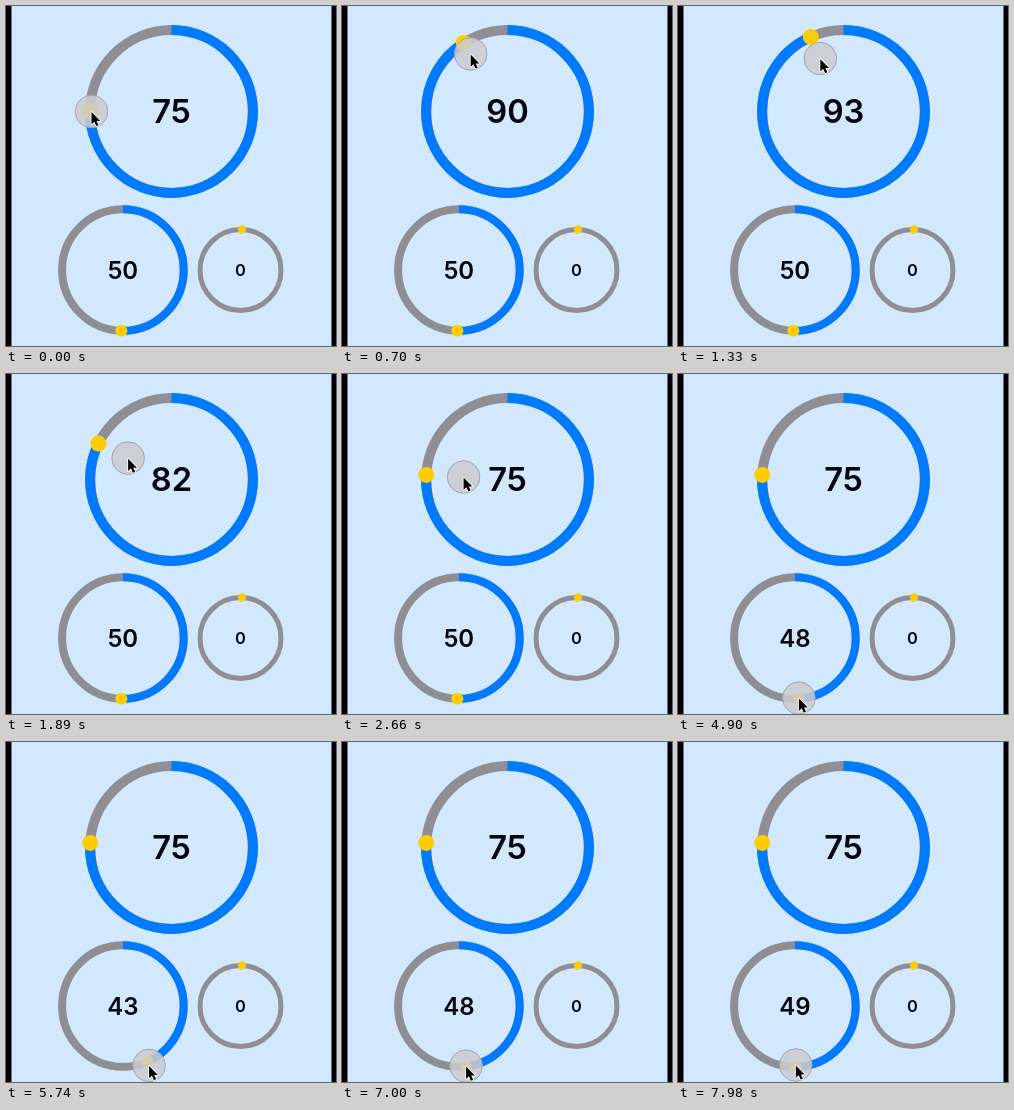
An HTML page with a canvas for the animation above (8000 ms loop, 330x340 px).

```html
<!DOCTYPE html>
<html lang="en">
<head>
<meta charset="utf-8">
<title>Circular sliders</title>
<style>
  html, body { margin: 0; width: 100%; height: 100%; overflow: hidden; background: #000; }
  canvas { display: block; }
</style>
</head>
<body>
<canvas id="stage" width="330" height="340"></canvas>
<script>
const ctx = document.getElementById('stage').getContext('2d');
const LOOP = 8000, STEP = 70, TAU = Math.PI * 2;
const RELEASE = 2800, PRESS = 4550;

const large = { x: 165.5, y: 105.5, r: 81.4, width: 10, knob: 8, font: 32.7 };
const medium = { x: 116.9, y: 264, r: 60.8, width: 8, knob: 6, font: 24 };
const small = { x: 234.5, y: 264, r: 40.5, width: 5, knob: 4, font: 16.5 };

const linear = (t, from, to) => Math.min(1, Math.max(0, (t - from) / (to - from)));
const easeOut = (t, from, to) => 1 - (1 - linear(t, from, to)) ** 2;
function easeInOut(t, from, to) {
  const k = linear(t, from, to);
  return k * k * (3 - 2 * k);
}
const mix = (a, b, k) => ({ x: a.x + (b.x - a.x) * k, y: a.y + (b.y - a.y) * k });

// Position at a fraction of a turn, clockwise from the top of a dial
const onDial = (d, turn, radius = d.r) => ({
  x: d.x + radius * Math.sin(turn * TAU),
  y: d.y - radius * Math.cos(turn * TAU)
});

// Values swing out and back; the pointer follows them around the dials.
function stateAt(t) {
  const back = easeOut(t, 6050, 7980);
  const out = easeInOut(t, PRESS, 5740);
  const largeTurn = 0.75 + 0.24 * easeInOut(t, 150, 1050) - 0.231 * linear(t, 1050, 2210);
  const mediumTurn = 0.504 - 0.07 * out + 0.0635 * back;

  const first = onDial(large, largeTurn, 80 - 36 * linear(t, 0, 2150));
  const second = onDial(medium, mediumTurn, 59 + 6 * (out - back));
  const approach = mix(first, { x: 135, y: 319 }, easeInOut(t, 2900, 3850));
  return {
    largeTurn, mediumTurn,
    pointer: mix(approach, second, easeInOut(t, 3850, 4250)),
    touching: t < RELEASE || t >= PRESS
  };
}

function disc({ x, y }, r, color) {
  ctx.beginPath();
  ctx.arc(x, y, r, 0, TAU);
  ctx.fillStyle = color;
  ctx.fill();
}

function ring(d, turn, color) {
  ctx.beginPath();
  ctx.arc(d.x, d.y, d.r, -TAU / 4, (turn - 0.25) * TAU);
  ctx.lineWidth = d.width;
  ctx.strokeStyle = color;
  ctx.stroke();
}

function drawDial(d, turn) {
  ring(d, 1, '#8e8e93');
  ring(d, turn, '#007aff');
  disc(onDial(d, turn), d.knob, '#ffcc00');
  ctx.font = `600 ${d.font}px Inter, sans-serif`;
  ctx.textAlign = 'center';
  ctx.fillStyle = '#05070a';
  ctx.fillText(Math.floor(turn * 100), d.x, d.y + d.font * 0.364);
}

function drawTouch(point) {
  disc(point, 16.3, 'rgba(204,204,208,0.86)');
  ctx.lineWidth = 1;
  ctx.strokeStyle = '#a2a6ac';
  ctx.stroke();
}

function drawCursor({ x, y }) {
  const arrow = new Path2D('M0 0V14L3.2 11L5.5 16L8 15L5.8 10.2H10Z');
  ctx.save();
  ctx.translate(x, y + 0.5);
  ctx.scale(0.88, 0.88);
  ctx.lineWidth = 1.8;
  ctx.lineJoin = 'round';
  ctx.strokeStyle = '#fff';
  ctx.stroke(arrow);
  ctx.fillStyle = '#000';
  ctx.fill(arrow);
  ctx.restore();
}

function draw(now) {
  const t = Math.floor((now % LOOP) / STEP) * STEP;
  const { largeTurn, mediumTurn, pointer, touching } = stateAt(t);

  ctx.fillStyle = '#000';
  ctx.fillRect(0, 0, 330, 340);
  ctx.fillStyle = '#d1e8fe';
  ctx.fillRect(5.5, 0, 320, 340);

  drawDial(large, largeTurn);
  drawDial(medium, mediumTurn);
  drawDial(small, 0.006);
  if (touching) drawTouch(pointer);
  drawCursor(pointer);
}

const start = performance.now();
function tick() {
  draw(performance.now() - start);
  requestAnimationFrame(tick);
}
tick();
</script>
</body>
</html>
```
